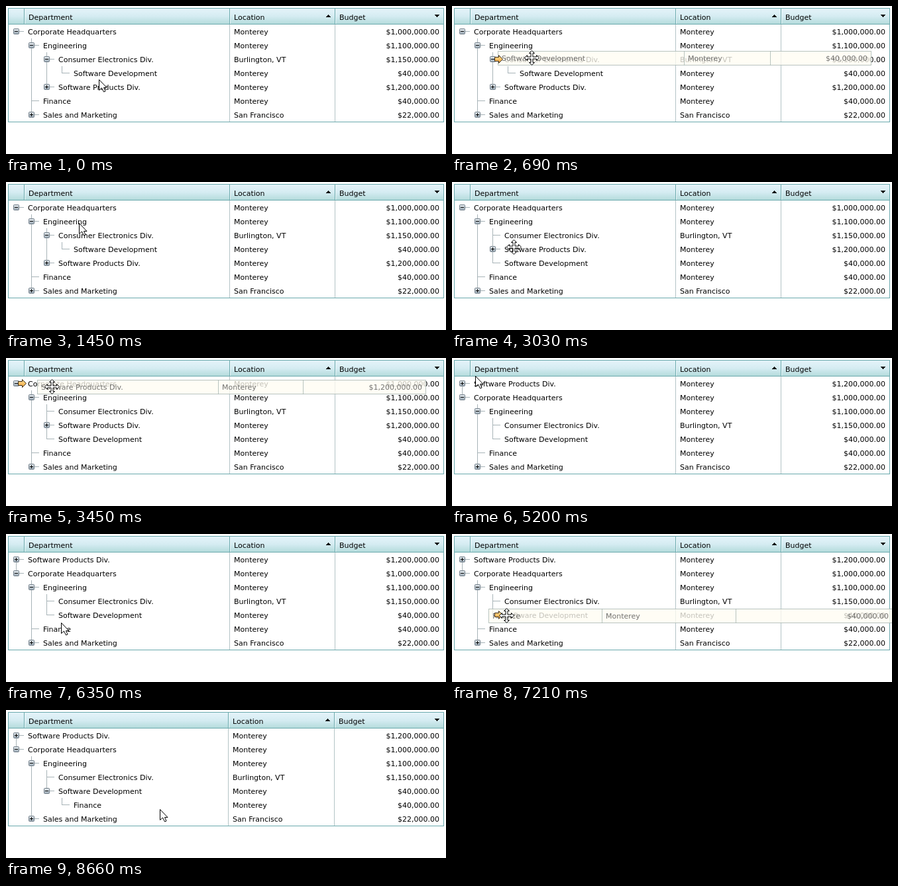
Animation of 664 by 224 pixels, one loop 8790 ms. Source, as an HTML page with a canvas:

```html
<!DOCTYPE html>
<html lang="en">
<head>
<meta charset="utf-8">
<title>Tree list drag and drop</title>
<style>
  html, body { margin: 0; width: 100%; height: 100%; overflow: hidden; background: #fff; }
  canvas { display: block; }
</style>
</head>
<body>
<canvas id="stage" width="664" height="224"></canvas>
<script>
const ctx = document.getElementById('stage').getContext('2d');
const LOOP = 8790, ROW = 21, TOP = 28, INDENT = 23;
const TEAL = '#6aa9ad', LINE = '#a8b4b8', GHOST_LINE = '#a3b3b0', GHOST_TEXT = '#484848';

const depts = {
  corp: ['Corporate Headquarters', 'Monterey', '$1,000,000.00'],
  eng: ['Engineering', 'Monterey', '$1,100,000.00'],
  cons: ['Consumer Electronics Div.', 'Burlington, VT', '$1,150,000.00'],
  dev: ['Software Development', 'Monterey', '$40,000.00'],
  prod: ['Software Products Div.', 'Monterey', '$1,200,000.00'],
  fin: ['Finance', 'Monterey', '$40,000.00'],
  sales: ['Sales and Marketing', 'San Francisco', '$22,000.00']
};

// Each row: department, level, expand sign
const parse = text => text.split(' ').map(item => {
  const [, id, level, sign] = item.match(/([a-z]+)(\d)(.?)/);
  return { id, level: +level, sign };
});
const firstTree = parse('corp0- eng1- cons2- dev3 prod2+ fin1 sales1+');

// The row is held from grab to release; the tree changes at done
const drags = [
  { id: 'dev', grab: 260, release: 1450, done: 1580, offset: 51,
    tree: parse('corp0- eng1- cons2 prod2+ dev2 fin1 sales1+') },
  { id: 'prod', grab: 3030, release: 4410, done: 4540, offset: 22,
    tree: parse('prod0+ corp0- eng1- cons2 dev2 fin1 sales1+') },
  { id: 'fin', grab: 6730, release: 7540, done: 7670, offset: 27,
    tree: parse('prod0+ corp0- eng1- cons2 dev2- fin3 sales1+') }
];
const GHOST_DELAY = 60;

// Pointer moves: start, end, x, y
const moves = [
  [195, 990, 110, 62], [2105, 2560, 99, 114], [2560, 3030, 93, 98], [3030, 3510, 68, 41],
  [3645, 3950, 54, 16], [5075, 5340, 12, 40], [5340, 5740, 118, 60], [5740, 6350, 83, 134],
  [6350, 6590, 83, 143], [6725, 7210, 82, 123], [7865, 8120, 52, 134], [8120, 8660, 232, 150]
];

function pointerAt(time) {
  let x = 140, y = 111;
  for (const [start, end, toX, toY] of moves) {
    const u = Math.min(1, Math.max(0, (time - start) / (end - start)));
    const k = u * u * (3 - 2 * u);
    x += (toX - x) * k;
    y += (toY - y) * k;
  }
  return [Math.round(x), Math.round(y)];
}

function rect(x, y, w, h, fill) {
  ctx.fillStyle = fill;
  ctx.fillRect(x, y, w, h);
}

function text(str, x, y, align = 'left', color = '#000') {
  ctx.fillStyle = color;
  ctx.textAlign = align;
  ctx.fillText(str, x, y);
}

function shape(x, y, points, fill, stroke) {
  ctx.beginPath();
  points.forEach(([px, py]) => ctx.lineTo(x + px, y + py));
  ctx.closePath();
  ctx.fillStyle = fill;
  ctx.fill();
  ctx.strokeStyle = stroke;
  ctx.stroke();
}

function gradient(y0, y1, ...colors) {
  const g = ctx.createLinearGradient(0, y0, 0, y1);
  colors.forEach((c, i) => g.addColorStop(i / (colors.length - 1), c));
  return g;
}

function drawSortMark(x, up) {
  for (let i = 0; i < 4; i++) rect(x - i, up ? 13 + i : 16 - i, 2 * i + 1, 1, '#000');
}

function drawHeader(cols) {
  rect(3, 3, 658, 25, gradient(3, 28, '#e6f4fa', '#d5ecf2', '#b2dada'));
  [27, ...cols].forEach(x => {
    rect(x, 4, 1, 23, TEAL);
    rect(x + 1, 4, 1, 23, '#eef8fa');
  });
  rect(3, 27, 658, 1, TEAL);
  text('Department', 34, 21);
  text('Location', cols[0] + 7, 21);
  text('Budget', cols[1] + 7, 21);
  drawSortMark(cols[1] - 10, true);
  drawSortMark(650, false);
}

function drawButton(x, y, sign) {
  ctx.beginPath();
  ctx.roundRect(x - 4, y - 4, 9, 9, 2);
  ctx.fillStyle = '#717e89';
  ctx.fill();
  rect(x - 3, y - 3, 7, 7, gradient(y - 3, y + 4, '#e2e8ec', '#9dabb6'));
  rect(x - 2, y, 5, 1, '#000');
  if (sign === '+') rect(x, y - 2, 1, 5, '#000');
}

function drawRow(rows, i, cols) {
  const { id, level, sign } = rows[i], [name, place, budget] = depts[id];
  const top = TOP + i * ROW, mid = top + 10, x = 15 + level * INDENT;
  for (let l = 0; l <= level; l++) {
    const next = rows.slice(i + 1).find(r => r.level <= l);
    const from = l < level ? top : mid;
    if (next && next.level === l) rect(15 + l * INDENT, from, 1, top + ROW - from, LINE);
  }
  if (i > 0) rect(x, top, 1, 11, LINE);
  rect(x, mid, 12, 1, LINE);
  if (sign) drawButton(x, mid, sign);
  text(name, x + 18, top + 15);
  text(place, cols[0] + 7, top + 15);
  text(budget, 654, top + 15, 'right');
}

// The dragged cells share the row's width in proportion to their text
function drawGhost(rows, { id, offset }, x, y) {
  const { level } = rows.find(r => r.id === id);
  const needs = depts[id].map(s => ctx.measureText(s).width + 12);
  const width = 633 - level * INDENT;
  const scale = width / needs.reduce((a, b) => a + b);
  const left = x - offset, top = y - 10;
  ctx.globalAlpha = 0.77;
  rect(left, top, width, 22, '#fffdf2');
  ctx.strokeStyle = GHOST_LINE;
  ctx.strokeRect(left + 0.5, top + 0.5, width - 1, 21);
  let cell = left;
  depts[id].forEach((str, i) => {
    const end = Math.round(cell + needs[i] * scale);
    if (i < 2) {
      rect(end, top, 1, 22, GHOST_LINE);
      text(str, cell + 6, y + 5, 'left', GHOST_TEXT);
    } else {
      text(str, left + width - 6, y + 5, 'right', GHOST_TEXT);
    }
    cell = end;
  });
  ctx.globalAlpha = 1;
}

function drawTarget(rows, id, y) {
  const i = Math.floor((y - TOP) / ROW);
  if (i >= 0 && rows[i].id === id) return;
  const x = 18 + (i < 0 ? 0 : rows[i].level * INDENT);
  const top = i < 0 ? 10 : TOP + i * ROW + 4;
  shape(x + 0.5, top + 0.5,
    [[0, 3], [6, 3], [6, 0], [12, 6], [6, 12], [6, 9], [0, 9]],
    gradient(top, top + 12, '#ffe39a', '#f5a840'), '#3a2a18');
}

const arrow = [[0, 0], [0, 16], [4, 12.5], [7, 18.5], [9.5, 17.5], [7, 12], [11.5, 12]];
const arm = [[-1.5, -1.5], [-1.5, -7], [-4, -7], [0, -11], [4, -7], [1.5, -7]];
const quarter = points => points.map(([x, y]) => [-y, x]);
const mover = [arm, quarter(arm), quarter(quarter(arm)), quarter(quarter(quarter(arm)))].flat();

function draw(time) {
  const dropped = drags.filter(d => d.done <= time);
  const rows = dropped.length ? dropped.at(-1).tree : firstTree;
  const cols = dropped.length < drags.length ? [337, 496] : [335, 495];
  const drag = drags.find(d => time >= d.grab && time < d.release);
  const [x, y] = pointerAt(time);

  ctx.font = '11px "DejaVu Sans", sans-serif';
  ctx.lineWidth = 1;
  rect(0, 0, 664, 224, '#fff');
  drawHeader(cols);
  cols.forEach(c => rect(c, TOP, 1, 147, '#b4c4c6'));
  rows.forEach((_, i) => drawRow(rows, i, cols));
  ctx.strokeStyle = TEAL;
  ctx.strokeRect(3.5, 3.5, 657, 172);

  if (drag && time >= drag.grab + GHOST_DELAY) {
    drawGhost(rows, drag, x, y);
    drawTarget(rows, drag.id, y);
  }
  shape(x + 0.5, y + 0.5, drag ? mover : arrow, '#fff', '#000');
}

function tick() {
  draw(performance.now() % LOOP);
  requestAnimationFrame(tick);
}
tick();
</script>
</body>
</html>
```
